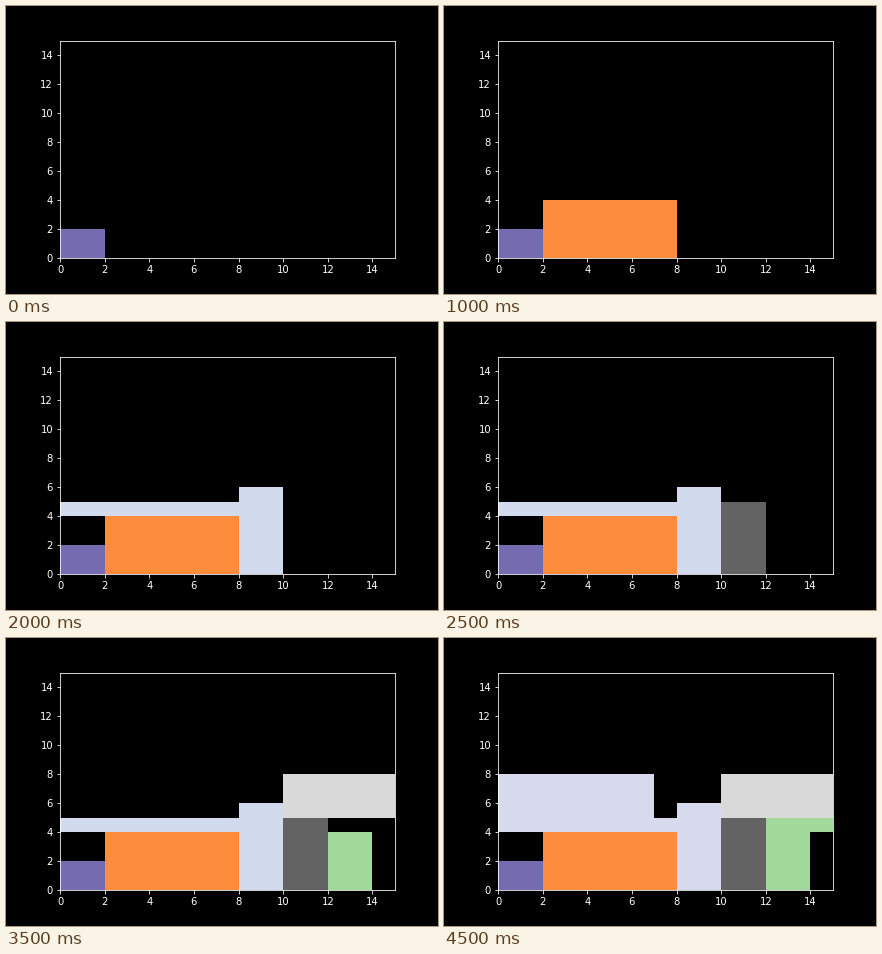
A matplotlib script that plays this animation: 432 by 288 pixels, repeating every 5000 ms.

```python
import matplotlib.pyplot as plt
from matplotlib.animation import FuncAnimation
from matplotlib.colors import to_rgb
from matplotlib.patches import Rectangle
import numpy as np

plt.style.use("dark_background")

PURPLE, ORANGE, LILAC = "#756bb1", "#fd8d3c", "#dadaeb"
ICE, GREY, GREEN, SILVER = "#c6dbef", "#636363", "#a1d99b", "#d9d9d9"
PALE = (LILAC, ICE)

# x, y, width, height, colour in order of placing
BLOCKS = [
    (0, 0, 2, 2, PURPLE),
    (2, 0, 2, 4, ORANGE),
    (4, 0, 4, 4, ORANGE),
    (8, 0, 2, 6, LILAC),
    (0, 4, 8, 1, ICE),
    (10, 0, 2, 5, GREY),
    (12, 0, 2, 4, GREEN),
    (10, 5, 5, 3, SILVER),
    (12, 4, 3, 1, GREEN),
    (0, 5, 7, 3, LILAC),
]

fig = plt.figure(figsize=(6, 4), dpi=72)
fig.subplots_adjust(left=0.125, right=0.9, bottom=0.125, top=0.88)
ax = fig.add_subplot()
ax.set(xlim=(0, 15), ylim=(0, 15),
       xticks=range(0, 15, 2), yticks=range(0, 15, 2))

patches = [
    ax.add_patch(Rectangle((x, y), w, h, facecolor=c, edgecolor="none", lw=0))
    for x, y, w, h, c in BLOCKS
]


def pale_tint(count):
    """Area-weighted mean of the pale blocks placed so far."""
    pale = [b for b in BLOCKS[:count] if b[4] in PALE]
    if not pale:
        return to_rgb(LILAC)
    return np.average([to_rgb(b[4]) for b in pale], axis=0,
                      weights=[b[2] * b[3] for b in pale])


def update(step):
    tint = pale_tint(step + 1)
    for i, (patch, block) in enumerate(zip(patches, BLOCKS)):
        patch.set_visible(i <= step)
        if block[4] in PALE:
            patch.set_facecolor(tint)
    return patches


anim = FuncAnimation(fig, update, frames=len(BLOCKS), interval=500,
                     init_func=lambda: update(0), repeat=True,
                     repeat_delay=0, blit=False)
plt.show()
```
